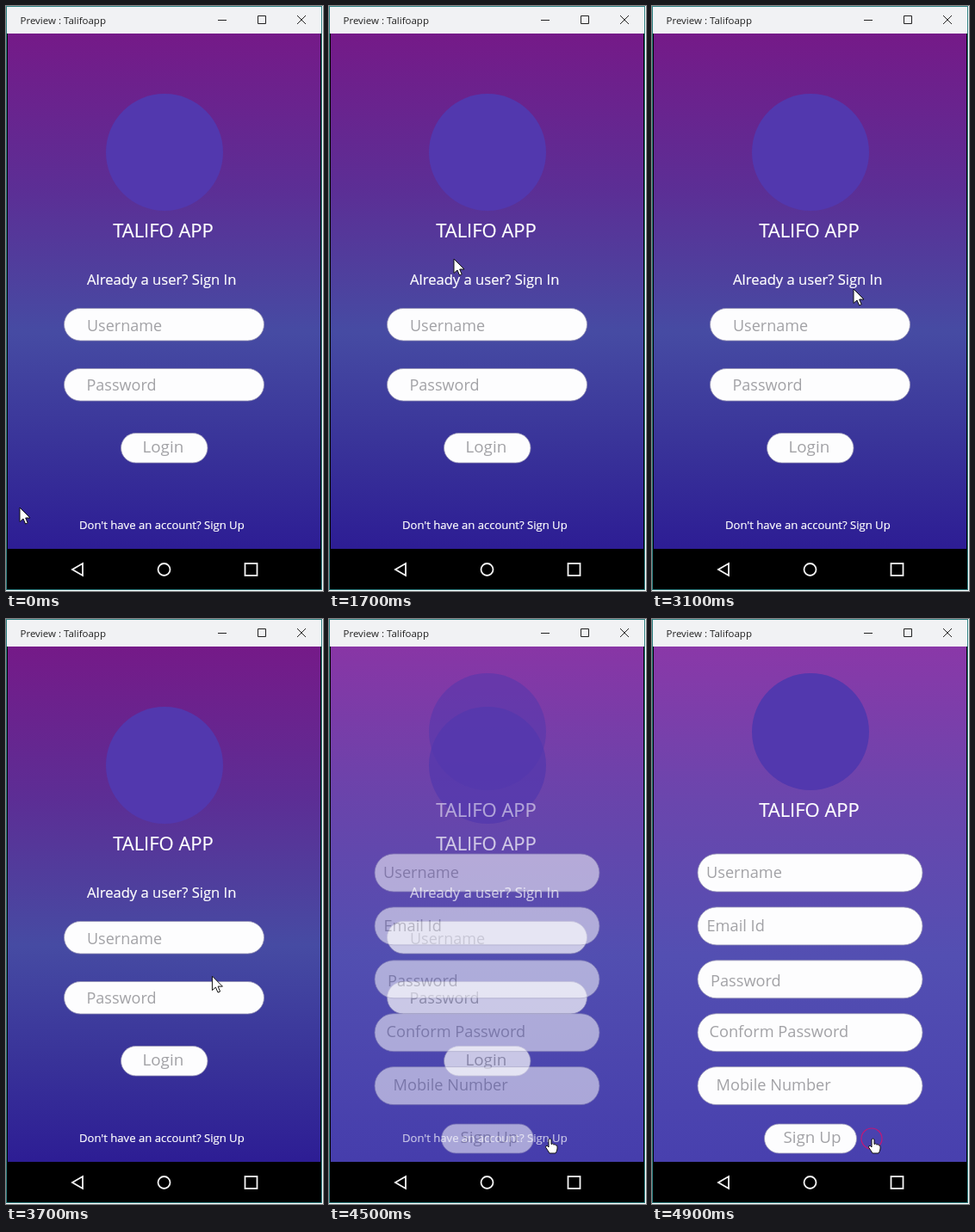
Recreate the animation shown at these times as an HTML page. Size 368x680 px, loop 5 s.

```html
<!DOCTYPE html>
<html lang="en">
<head>
<meta charset="utf-8">
<title>Login preview</title>
<style>
  html, body { margin: 0; width: 100%; height: 100%; overflow: hidden; background: #fff; }
  svg { display: block; width: 368px; height: 680px; }
  text { font-family: "Open Sans", "Noto Sans", sans-serif; fill: #fff; stroke: #fff; stroke-width: .2; }
  .hint { fill: #a2a2a6; stroke: none; }
  .title { fill: #222; stroke: none; }
  .pill { fill: #fdfdfe; stroke: #9592b4; stroke-width: .8; }
  .line { fill: none; stroke: #f4f4f4; stroke-width: 1.8; }
  .ctrl { fill: none; stroke: #222; stroke-width: 1; }
</style>
</head>
<body>
<svg viewBox="0 0 368 680">
  <defs>
    <linearGradient id="loginBg" x2="0" y2="1">
      <stop offset="0" stop-color="#751a88"/>
      <stop offset=".3" stop-color="#5c2e95"/>
      <stop offset=".58" stop-color="#464ba3"/>
      <stop offset=".8" stop-color="#393399"/>
      <stop offset="1" stop-color="#2d1d94"/>
    </linearGradient>
    <linearGradient id="signupBg" x2="0" y2="1">
      <stop offset="0" stop-color="#8a38a8"/>
      <stop offset=".3" stop-color="#6a46ad"/>
      <stop offset=".6" stop-color="#534fb2"/>
      <stop offset="1" stop-color="#4840ae"/>
    </linearGradient>
  </defs>

  <rect width="367" height="679" fill="#2f8284"/>
  <rect x="1" y="1" width="365" height="31" fill="#f1f2f4"/>
  <rect x="1" y="32" width="365" height="646"/>
  <text class="title" x="16.5" y="21" font-size="11.5">Preview : Talifoapp</text>
  <path class="ctrl" d="M246 16.5h10M292.5 11.5h9v9h-9zM338 11l10 10M348 11l-10 10"/>

  <rect x="2" y="32" width="363" height="599" fill="url(#loginBg)"/>
  <rect id="tint" x="2" y="32" width="363" height="599" fill="url(#signupBg)"/>
  <g id="login"></g>
  <g id="signup"></g>

  <path class="line" d="M89 648v14L77 655z"/>
  <circle class="line" cx="183.500" cy="655" r="7"/>
  <rect class="line" x="277.500" y="648" width="14" height="14"/>

  <circle id="ring" cx="255" cy="604" r="12" fill="none" stroke="#c01878" stroke-width="1.200"/>
  <path id="arrow" fill="#fff" stroke="#111" d="M0 0V16.500L4 13L6.600 19L9.200 17.900L6.700 12H12z"/>
  <path id="hand" fill="#fff" stroke="#111" stroke-linejoin="round"
    d="M-2 1Q-.5-1 1 1V6.500Q2.700 5 3.800 7Q5.300 6 6.300 7.800Q8 7 8 9.500V12Q7.500 15 6 17H-1Q-3.500 13-5.500 10Q-5.500 7.500-3.500 8.500L-2 10z"/>
</svg>

<script>
const $ = id => document.getElementById(id);
const label = (x, y, size, str, cls = "") =>
  `<text class="${cls}" x="${x}" y="${y}" font-size="${size}">${str}</text>`;
const pill = (x, y, w, h) =>
  `<rect class="pill" x="${x}" y="${y}" width="${w}" height="${h}" rx="${h / 2}"/>`;
const header = y =>
  `<circle cx="184" cy="${y}" r="68" fill="#5238ae"/>
   <text x="182.500" y="${y + 99}" font-size="22" text-anchor="middle">TALIFO APP</text>`;

$("login").innerHTML = header(170) +
  label(94, 324, 16.6, "Already a user? Sign In") +
  pill(67.5, 351.5, 232, 37.5) + label(94, 378, 18, "Username", "hint") +
  pill(67.5, 421.5, 232, 37.5) + label(93.5, 447, 18, "Password", "hint") +
  pill(133.5, 496.5, 100.5, 34.5) + label(158.5, 519, 18.8, "Login", "hint") +
  label(85, 608, 13.1, "Don't have an account? Sign Up");

const fields = [
  ["Username", 63, 301], ["Email Id", 63.5, 363], ["Password", 68, 427],
  ["Conform Password", 66.5, 486], ["Mobile Number", 74.5, 548]
];
$("signup").innerHTML = header(131) +
  fields.map(([str, x, y], i) =>
    pill(53, 273 + i * 61.9, 261, 44) + label(x, y, 18.2, str, "hint")).join("") +
  pill(130.5, 587, 107, 34) + label(152.5, 609, 18.8, "Sign Up", "hint");

// pointer path: time, x, y
const path = [
  [0, 16, 583], [200, 27, 578], [900, 27, 578], [1300, 215, 525],
  [1700, 145, 294], [2300, 222, 323], [2500, 222, 323], [3100, 234, 329],
  [3600, 238, 400], [4200, 257, 604], [5000, 257, 604]
];
const clamp = v => Math.max(0, Math.min(1, v));

function pointer(t) {
  const i = path.findIndex(p => p[0] > t);
  const [t0, x0, y0] = path[i - 1], [t1, x1, y1] = path[i];
  const k = (t - t0) / (t1 - t0), e = k * k * (3 - 2 * k);
  return [x0 + (x1 - x0) * e, y0 + (y1 - y0) * e];
}

const show = (id, on) => $(id).setAttribute("visibility", on ? "visible" : "hidden");
const fade = (id, v) => $(id).setAttribute("opacity", v);

function draw(now) {
  const t = Math.floor(now % 5000 / 100) * 100;
  const onLink = t >= 4200;
  const at = `translate(${pointer(t)})`;
  $("arrow").setAttribute("transform", at);
  $("hand").setAttribute("transform", at);
  show("arrow", !onLink);
  show("hand", onLink);
  show("ring", t >= 4800);

  const k = clamp((t - 4300) / 370);
  fade("tint", clamp(k * 1.7));
  fade("login", 1 - k * k);
  fade("signup", k);
  requestAnimationFrame(draw);
}
draw(performance.now());
</script>
</body>
</html>
```
